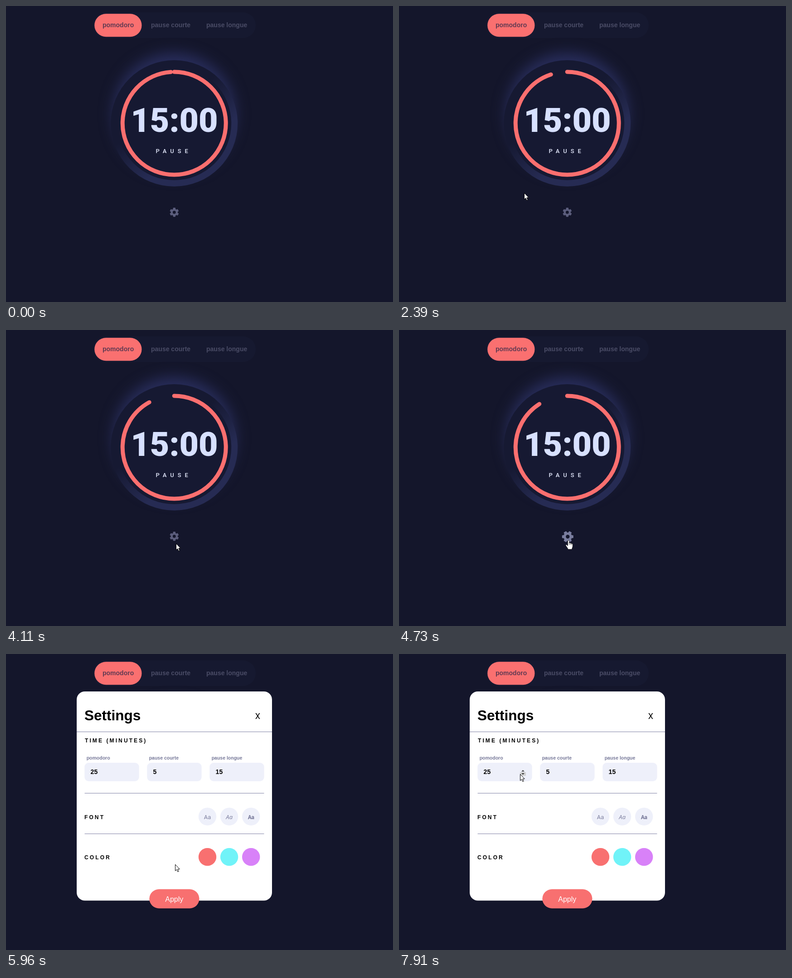
An HTML page for the animation above (8 s loop, 854 by 656 pixels).

```html
<!DOCTYPE html>
<html lang="fr">
<head>
<meta charset="utf-8">
<title>Pomodoro</title>
<style>
  html, body { margin: 0; width: 100%; height: 100%; overflow: hidden; background: #14162b; }
  svg { display: block; width: 854px; height: 656px; font: bold 14px "Liberation Sans", Arial, sans-serif; }
  .mid { text-anchor: middle; }
  .idle { fill: #4a4c66; }
  .heading { font-size: 12px; letter-spacing: 3.1px; }
  .label { font-size: 10.5px; fill: #787a9a; }
  .field { fill: #eef0fa; }
  .rule { stroke: #7f81a5; }
  .sample { font-size: 13px; font-weight: 400; fill: #7f81a0; text-anchor: middle; }
  #time { font: 800 73.5px Roboto, sans-serif; fill: #d7e0ff; }
  #pause { font: 500 13px Roboto, sans-serif; letter-spacing: 8px; fill: #e2e7fb; }
</style>
</head>
<body>
<svg viewBox="0 0 854 656">
  <defs>
    <filter id="blur" x="-30%" y="-30%" width="160%" height="160%" color-interpolation-filters="sRGB">
      <feGaussianBlur stdDeviation="15"/>
    </filter>
    <linearGradient id="rim" gradientUnits="userSpaceOnUse" x1="351" y1="231" x2="410" y2="315">
      <stop stop-color="#161932"/>
      <stop offset="1" stop-color="#262b53"/>
    </linearGradient>
  </defs>

  <rect x="193" y="14" width="358" height="57" rx="28.5" fill="#161930"/>
  <rect x="195.2" y="17.3" width="104.3" height="51" rx="25.5" fill="#fa7070"/>
  <text x="213" y="47" fill="#603a52">pomodoro</text>
  <text x="320" y="47" class="idle">pause courte</text>
  <text x="442" y="47" class="idle">pause longue</text>

  <circle cx="371.2" cy="239" r="135" fill="#282d5b" filter="url(#blur)"/>
  <circle cx="371.2" cy="260" r="140" fill="url(#rim)"/>
  <circle cx="371.2" cy="260" r="126" fill="#161932"/>
  <circle id="progress" cx="371.2" cy="260" r="114" pathLength="360" transform="rotate(-90 371.2 260)"
    fill="none" stroke="#fc6f6f" stroke-width="9" stroke-linecap="round"/>
  <text id="time" class="mid" x="371.5" y="279">15:00</text>
  <text id="pause" x="330.5" y="326">PAUSE</text>

  <path id="gear" d="M19.14 12.94c.04-.3.06-.61.06-.94 0-.32-.02-.64-.07-.94l2.03-1.58c.18-.14.23-.41.12-.61l-1.92-3.32c-.12-.22-.37-.29-.59-.22l-2.39.96c-.5-.38-1.03-.7-1.62-.94l-.36-2.54c-.04-.24-.24-.41-.48-.41h-3.84c-.24 0-.43.17-.47.41l-.36 2.54c-.59.24-1.13.57-1.62.94l-2.39-.96c-.22-.08-.47 0-.59.22L2.74 8.87c-.12.21-.08.47.12.61l2.03 1.58a6 6 0 0 0 0 1.88l-2.03 1.58c-.18.14-.23.41-.12.61l1.92 3.32c.12.22.37.29.59.22l2.39-.96c.5.38 1.03.7 1.62.94l.36 2.54c.05.24.24.41.48.41h3.84c.24 0 .44-.17.47-.41l.36-2.54c.59-.24 1.13-.56 1.62-.94l2.39.96c.22.08.47 0 .59-.22l1.92-3.32c.12-.22.07-.47-.12-.61zM12 15.2a3.2 3.2 0 1 1 0-6.4 3.2 3.2 0 0 1 0 6.4z"/>

  <g id="modal">
    <rect x="156" y="83" width="431" height="463.5" rx="18" fill="#fff"/>
    <text x="173" y="147" font-size="31.5">Settings</text>
    <text x="555.3" y="144" class="mid" style="font:400 18px Roboto,sans-serif">X</text>
    <path class="rule" d="M156 172.5H587M173.5 308.5H569.5M173.5 398.5H569.5"/>
    <text x="174" y="196" class="heading">TIME (MINUTES)</text>
    <text x="173" y="365.5" class="heading">FONT</text>
    <text x="173" y="454.5" class="heading">COLOR</text>
    <g id="fields"></g>
    <g id="spinner">
      <rect id="spinDown" x="267" y="262" width="13" height="8" fill="#d2d2d2"/>
      <path d="M270 260.5h7l-3.5-3.5zM270 264h7l-3.5 3.5z" fill="#444"/>
    </g>
    <g id="choices"></g>
    <text x="444.5" y="365.5" class="sample" style="font-family:Roboto,sans-serif">Aa</text>
    <text x="492.7" y="366" class="sample" style="font-family:'Noto Sans',sans-serif;font-style:italic">Aa</text>
    <text x="540.5" y="365.5" class="sample" style="font:900 12px Roboto,sans-serif;letter-spacing:-.5px">Aa</text>
    <rect x="316.3" y="521.3" width="110.2" height="42.4" rx="21.2" fill="#f87070"/>
    <text x="371.3" y="549" class="mid" fill="#fff" font-size="16" font-weight="400">Apply</text>
  </g>

  <g id="cursor" stroke="#000" stroke-linejoin="round">
    <path id="arrow" d="M.5.5V14.6L3.7 11.6 5.9 16.7 8.1 15.8 6 10.8H10.3Z" fill="#fff"/>
    <path id="hand" stroke-width=".7" fill="#fff" d="M-1.6.4C-1.6-1.3 1.5-1.3 1.5.4V5C2.6 4 4.2 4.6 4.3 5.8 5.3 5 6.8 5.6 6.9 6.8 8 6.2 9.3 6.8 9.3 8.2V12C9.3 14.8 7.8 16 7.6 19H-1C-1.4 16.6-4.2 13.6-5.8 10.8-6.6 9.2-4.7 8-3.4 9.4L-1.6 11.2ZM1.5 5V9M4.3 5.8V9M6.9 6.8V9.5"/>
    <path id="beam" d="M-3-8.5H-1L0-8 1-8.5H3M0-8V8M-3 8.5H-1L0 8 1 8.5H3" fill="none"/>
  </g>
</svg>
<script>
const LOOP = 8000, MODAL_OPENS = 5920;
const el = id => document.getElementById(id);
const show = (id, visible) => el(id).style.display = visible ? '' : 'none';

el('fields').innerHTML = [['pomodoro', 25], ['pause courte', 5], ['pause longue', 15]].map(([name, value], i) => {
  const x = 173.3 + 138 * i;
  return `<text class="label" x="${x + 4.4}" y="234">${name}</text>
    <rect class="field" x="${x}" y="241" width="120.3" height="41" rx="9"/>
    <text x="${x + 13.3}" y="266">${value}</text>`;
}).join('');

el('choices').innerHTML = ['#f87070', '#70f3f8', '#d881f8'].map((color, i) => {
  const x = 444.5 + 48.1 * i;
  return `<circle class="field" cx="${x}" cy="360.3" r="19.7"/>
    <circle cx="${x}" cy="449.7" r="19.7" fill="${color}"/>`;
}).join('');

// Pointer hot spot: time, x, y
const pointerPath = [
  [1030, 187, 660], [1310, 214, 394], [1600, 223, 394], [2000, 224, 396],
  [2390, 276, 414], [2550, 337, 446], [2720, 371, 466], [3500, 371, 466],
  [3850, 382, 503], [4200, 374, 467], [5800, 374, 467], [5960, 373, 466],
  [6330, 361, 473], [6500, 365, 473], [6590, 365, 473], [7220, 223, 269],
  [7600, 223, 269], [7910, 267, 266], [LOOP, 267, 266]
];

const slope = (i, axis) => {
  const [a, b] = [pointerPath[i], pointerPath[i + 1]];
  return a && b ? (b[axis] - a[axis]) / (b[0] - a[0]) : 0;
};

// Smooth through passing points, at rest where the direction turns or stops
const tangent = (i, axis) => {
  const before = slope(i - 1, axis), after = slope(i, axis);
  return before * after > 0 ? 2 * before * after / (before + after) : 0;
};

function pointerAt(t) {
  if (t < pointerPath[0][0]) return [-50, -50];
  const i = pointerPath.findIndex(key => key[0] > t) - 1;
  const a = pointerPath[i], b = pointerPath[i + 1];
  const span = b[0] - a[0], u = (t - a[0]) / span, v = 1 - u;
  return [1, 2].map(axis =>
    a[axis] * v * v * (1 + 2 * u) + b[axis] * u * u * (1 + 2 * v)
    + span * u * v * (v * tangent(i, axis) - u * tangent(i + 1, axis)));
}

function render(t) {
  const open = t >= MODAL_OPENS;
  const [x, y] = pointerAt(t);
  const onGear = !open && Math.hypot(x - 371.5, y - 457) < 14;
  const onField = open && x > 173 && x < 293 && y > 241 && y < 282;
  const onSpinner = onField && x > 266;

  const gap = 3.8 + 6.1 * t / 1000;
  el('progress').setAttribute('stroke-dasharray', `${360 - gap} 360`);

  el('gear').setAttribute('fill', onGear ? '#797d9e' : '#5b5d7c');
  el('gear').setAttribute('transform', onGear
    ? 'translate(372.3 458) rotate(90) scale(1.3) translate(-12 -12)'
    : 'translate(371.3 457.2) scale(1.05) translate(-12 -12)');

  show('modal', open);
  show('spinner', onField);
  show('spinDown', onSpinner);

  el('cursor').setAttribute('transform', `translate(${Math.round(x)} ${Math.round(y)})`);
  show('hand', onGear);
  show('beam', onField && !onSpinner);
  show('arrow', !onGear && (!onField || onSpinner));
}

const start = performance.now();
function tick() {
  render((performance.now() - start) % LOOP);
  requestAnimationFrame(tick);
}
tick();
</script>
</body>
</html>
```
